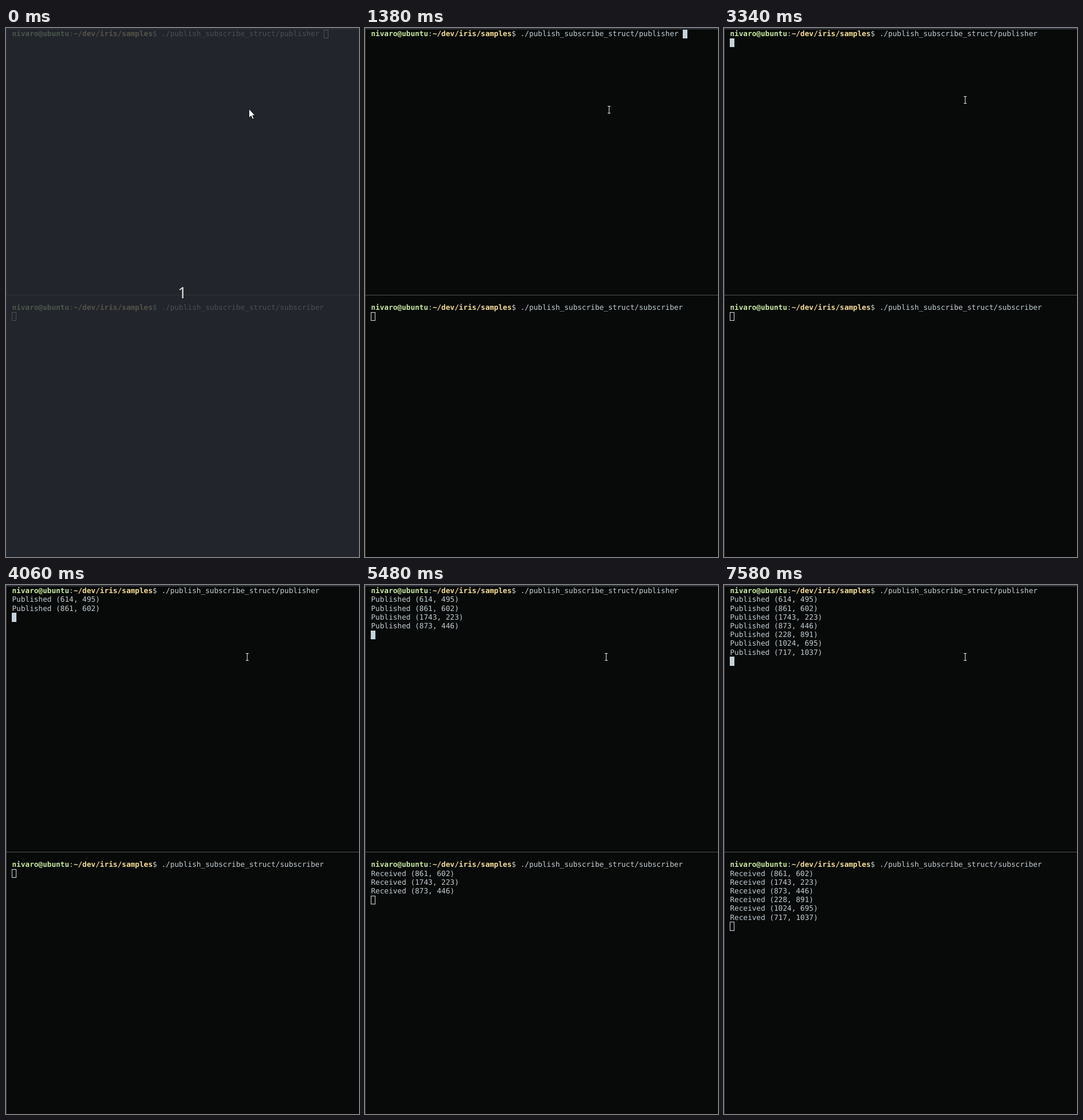
An HTML page that plays this animation: 611x916 px, repeating every 8 s.

```html
<!DOCTYPE html>
<html lang="en">
<head>
<meta charset="utf-8">
<title>Publish and subscribe</title>
<style>
  html, body { margin: 0; width: 100%; height: 100%; overflow: hidden; background: #080a09; }
  svg { display: block; width: 611px; height: 916px; }
  text { font: 12.63px "DejaVu Sans Mono", monospace; fill: #c3ced4; text-rendering: geometricPrecision; white-space: pre; }
  .user { font-weight: bold; fill: #c9e8a2; }
  .path { font-weight: bold; fill: #f6de98; }
  .cursor { fill: #c5d2da; shape-rendering: crispEdges; }
  .hollow { fill: none; stroke: #d5dde2; }
  .beam { fill: none; stroke: #e6e6e6; }
  .count { font: 27px "Noto Sans", "Open Sans", sans-serif; fill: #dadada; }
</style>
</head>
<body>
<svg id="stage" viewBox="0 0 611 916">
  <rect width="611" height="916" fill="#080a09"/>
  <rect width="611" height="2.5" fill="#2e3138"/>
  <rect y="2" width="1" height="914" fill="#454747"/>
  <rect y="462" width="611" height="1" fill="#515353"/>
  <g id="terminal"></g>
  <path id="beam" class="beam" d="M-2.5 -6H2.5M-2.5 6H2.5M0 -6V6"/>
  <g id="countdown">
    <rect width="611" height="916" fill="#292d35" fill-opacity=".79"/>
    <text class="count" x="297.5" y="468">1</text>
    <path d="M420.6 140V155.6L424.2 152.3L426.7 158L429.2 156.9L426.7 151.4H431Z" fill="#fff" stroke="#111" stroke-width="1"/>
  </g>
</svg>
<script>
const LOOP = 8000, LEFT = 10.5, CELL_W = 7.6, CELL_H = 15.2, BASELINE = 11.4;
const UPPER = 2.8, LOWER = 477;
const terminal = document.getElementById('terminal');
const timed = [];

function add(tag, attrs, parent = terminal) {
  const el = document.createElementNS('http://www.w3.org/2000/svg', tag);
  for (const name in attrs) el.setAttribute(name, attrs[name]);
  return parent.appendChild(el);
}

function show(el, from, to = LOOP) {
  timed.push({ el, from, to });
}

function line(pane, row, spans) {
  const text = add('text', { x: LEFT, y: pane + row * CELL_H + BASELINE });
  for (const [content, style = ''] of spans)
    add('tspan', { class: style }, text).textContent = content;
  return text;
}

function prompt(pane, program) {
  line(pane, 0, [['nivaro@ubuntu', 'user'], [':'], ['~/dev/iris/samples', 'path'],
    ['$ ./publish_subscribe_struct/' + program]]);
}

function cursor(pane, row, col, hollow) {
  const x = Math.round(LEFT + col * CELL_W - 0.1);
  const top = Math.round(pane + row * CELL_H);
  const height = Math.round(pane + (row + 1) * CELL_H) - top;
  return hollow
    ? add('rect', { class: 'hollow', x: x + 0.5, y: top + 0.5, width: 7, height: height - 1 })
    : add('rect', { class: 'cursor', x, y: top, width: 8, height });
}

// Each step: start time, row, column, hollow
function cursorSteps(pane, steps) {
  steps.forEach(([from, row, col = 0, hollow = false], i) =>
    show(cursor(pane, row, col, hollow), from, steps[i + 1]?.[0]));
}

// Each message: values, time published, time received
const messages = [
  ['614, 495', 3380],
  ['861, 602', 4060, 4180],
  ['1743, 223', 4780, 4920],
  ['873, 446', 5480, 5480],
  ['228, 891', 6180, 6300],
  ['1024, 695', 6880, 7000],
  ['717, 1037', 7580, 7580],
];

prompt(UPPER, 'publisher');
prompt(LOWER, 'subscriber');
messages.forEach(([values, published, received], i) => {
  show(line(UPPER, i + 1, [[`Published (${values})`]]), published);
  if (received) show(line(LOWER, i, [[`Received (${values})`]]), received);
});

cursorSteps(UPPER, [
  [0, 0, 71, true], [1380, 0, 71], [3340, 1], [3380, 2], [4060, 3], [4780, 4],
  [5480, 5], [6180, 6], [6880, 6, 21], [7000, 7], [7580, 8],
]);
cursorSteps(LOWER, [0, ...messages.slice(1).map(m => m[2])]
  .map((from, i) => [from, i + 1, 0, true]));

const beam = document.getElementById('beam');
show(document.getElementById('countdown'), 0, 120);
show(beam, 120);

function render() {
  const t = performance.now() % LOOP;
  for (const { el, from, to } of timed)
    el.style.visibility = t >= from && t < to ? 'visible' : 'hidden';
  beam.setAttribute('transform', t < 2240 ? 'translate(422.5 141.5)' : 'translate(417.5 124.5)');
  requestAnimationFrame(render);
}
render();
</script>
</body>
</html>
```
